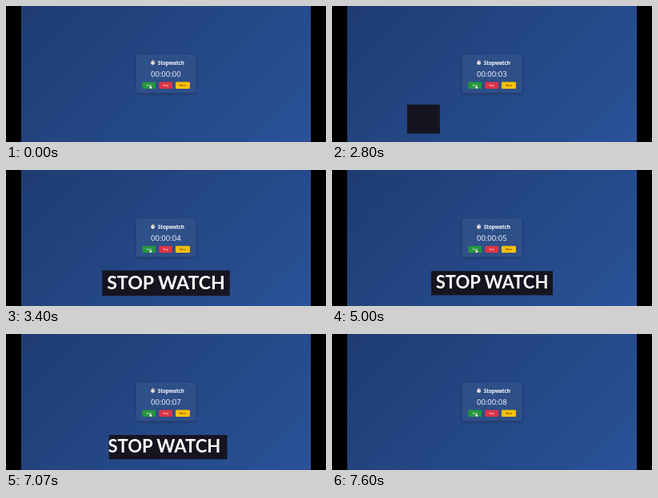
An HTML page for the animation above (8000 ms loop, 400 by 171 pixels).

```html
<!DOCTYPE html>
<html lang="en">
<head>
<meta charset="utf-8">
<title>Stopwatch</title>
<style>
  html, body { margin: 0; height: 100%; overflow: hidden; background: #000; }
  svg { display: block; width: 100vw; height: 100vh; }
  text { fill: #fff; font-family: "Open Sans", "Noto Sans", sans-serif; text-anchor: middle; }
  .title { font-size: 6.3px; font-weight: 700; text-anchor: start; }
  .time { font-size: 9.5px; }
  .label { font-size: 3.1px; }
  .banner { font: 700 22px Lato, sans-serif; }
</style>
</head>
<body>
<svg viewBox="0 0 400 171">
  <defs>
    <linearGradient id="sky" gradientUnits="userSpaceOnUse" x1="66.75" y1="-47.75" x2="333.25" y2="218.75">
      <stop stop-color="#1e3c72"/>
      <stop offset="1" stop-color="#2a5298"/>
    </linearGradient>
    <filter id="blur" x="-20%" y="-20%" width="140%" height="140%">
      <feGaussianBlur stdDeviation="1.6"/>
    </filter>
    <clipPath id="mask"><rect class="block" y="-15.2" height="30.4"/></clipPath>
  </defs>
  <rect x="19" width="362" height="171" fill="url(#sky)"/>

  <rect x="162.5" y="62" width="75" height="48.5" rx="3" opacity=".28" filter="url(#blur)"/>
  <rect x="162.5" y="61" width="75" height="48.5" rx="2.5" fill="#2f4f89"/>

  <!-- stopwatch icon -->
  <g transform="translate(183.6 71.6)">
    <path d="M0-3.4V-2M-.9-3.3H.9M1.9-2.4L2.4-2.9" stroke="#b9bcc4" stroke-width=".8"/>
    <circle r="2.4" fill="#f1eeee" stroke="#a9a5aa" stroke-width=".6"/>
    <path d="M0 .2L1-1.2" stroke="#c0392b" stroke-width=".6"/>
  </g>
  <text class="title" x="189.7" y="73.6">Stopwatch</text>
  <text class="time" id="time" x="199.8" y="89.2"></text>
  <g id="buttons"></g>

  <!-- hand pointer -->
  <path d="M179.6 99.2q.5-.5.9 0v1.6l1.5.4q.5.2.4.7l-.4 2h-2l-1.2-1.8q0-.6.8-.3z"
        fill="#fff" stroke="#222" stroke-width=".25"/>

  <g id="banner">
    <rect class="block" y="-15.2" height="30.4" fill="#161420"/>
    <g clip-path="url(#mask)"><text class="banner" id="caption" y="7">STOP WATCH</text></g>
  </g>
</svg>
<script>
const LOOP = 8000;
const TICKS = [470, 1470, 2070, 3130, 4200, 5130, 6070, 7130];
const HALF = 76, DRIFT = 16;
const $ = id => document.getElementById(id);

const button = (x, w, fill, label, ink) =>
  `<rect x="${x}" y="95.5" width="${w}" height="8.5" rx="1.2" fill="${fill}"/>
   <text class="label" x="${x + w / 2}" y="100.8" style="fill:${ink}">${label}</text>`;
$('buttons').innerHTML =
  button(170.3, 16.8, '#24963f', 'Start', '#fff') +
  button(191.3, 16.6, '#dc3545', 'Stop', '#fff') +
  button(211.9, 18, '#ffc107', 'Reset', '#222');

const progress = (t, start, length) => Math.min(1, Math.max(0, (t - start) / length));
const easeInOut = x => x < .5 ? 2 * x * x : 1 - 2 * (1 - x) ** 2;
const easeOut = x => 1 - (1 - x) ** 2;

function draw(t) {
  $('time').textContent = '00:00:0' + TICKS.filter(at => t >= at).length;

  // The block wipes in from the left and out to the right; the text slides leftwards.
  const enter = easeInOut(progress(t, 2600, 600));
  const leave = easeInOut(progress(t, 7000, 600));
  const scale = 1.2 - .2 * easeOut(progress(t, 3200, 400));
  const left = -HALF - DRIFT * (1 - enter) + (2 * HALF + DRIFT) * leave;
  const right = HALF - (2 * HALF + DRIFT) * (1 - enter) + DRIFT * leave;
  for (const block of document.querySelectorAll('.block')) {
    block.setAttribute('x', left);
    block.setAttribute('width', Math.max(0, right - left));
  }
  $('caption').setAttribute('x', HALF * (1 - enter - leave));
  $('banner').setAttribute('transform', `translate(200 142.2) scale(${scale})`);
  $('banner').style.display = enter > 0 && leave < 1 ? '' : 'none';
}

const start = performance.now();
function frame() {
  draw((performance.now() - start) % LOOP);
  requestAnimationFrame(frame);
}
frame();
</script>
</body>
</html>
```
